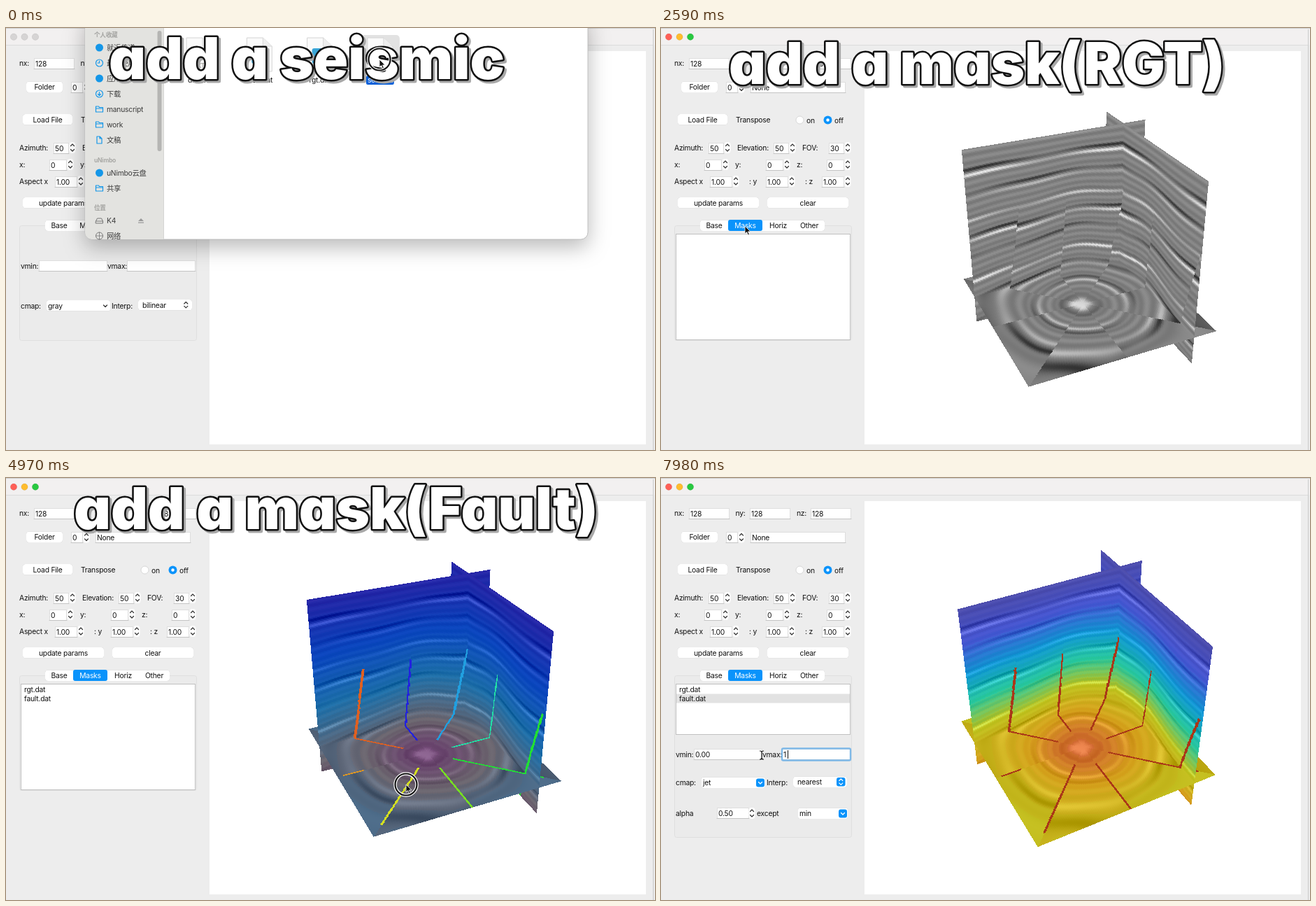
Write an HTML page with a canvas that moves like this. It is 928 px wide and 603 px high and loops after 8000 ms.

```html
<!DOCTYPE html>
<html lang="zh">
<head>
<meta charset="utf-8">
<title>Seismic volume viewer</title>
<style>
html, body { margin: 0; width: 100%; height: 100%; overflow: hidden; background: #ededed; }
#stage { position: relative; width: 928px; height: 603px; overflow: hidden; }
#stage > * { position: absolute; left: 0; top: 0; }
#view { left: 291px; top: 33px; }
text { font: 10.3px Inter, 'Noto Sans CJK SC', 'Noto Sans CJK', sans-serif; letter-spacing: -.22px; fill: #111; white-space: pre; }
text.white { fill: #fff; }
text.side { fill: #3c3c3c; }
text.head { font-size: 8.6px; font-weight: 600; fill: #a3a3a0; }
text.title { font: 900 82px Inter, 'Open Sans', sans-serif; font-feature-settings: 'cv11'; letter-spacing: 0;
  fill: #fff; stroke: #111; stroke-width: 5px; stroke-linejoin: round; paint-order: stroke;
  filter: drop-shadow(3px 3px 0 #a8a8a8); }
.dialog { filter: drop-shadow(0 11px 15px rgba(0, 0, 0, .27)); }
.btn { filter: drop-shadow(0 .6px .5px rgba(0, 0, 0, .28)); }
</style>
</head>
<body>
<div id="stage">
  <svg width="928" height="603"><g id="window"></g><g id="panel"></g></svg>
  <canvas id="view" width="624" height="562"></canvas>
  <svg width="928" height="603"><g id="finder"></g><g id="drag"></g><g id="title"></g><g id="cursor"></g></svg>
</div>
<script>
const LOOP = 8000, STEP = 70, BLUE = '#0a93fb';
const $ = id => document.getElementById(id);

// ---------- drawing helpers ----------
const text = (x, y, s, cls = '', anchor = 'start') =>
  `<text x="${x}" y="${y}" class="${cls}" text-anchor="${anchor}">${s}</text>`;
const rect = (x, y, w, h, fill, r = 0, more = '') =>
  `<rect x="${x}" y="${y}" width="${w}" height="${h}" rx="${r}" fill="${fill}" ${more}/>`;
const circle = (x, y, r, fill, more = '') => `<circle cx="${x}" cy="${y}" r="${r}" fill="${fill}" ${more}/>`;
const ring = (x, y, r, color, w = 1) => circle(x, y, r, 'none', `stroke="${color}" stroke-width="${w}"`);
const line = (d, color, w = 1.2) =>
  `<path d="${d}" fill="none" stroke="${color}" stroke-width="${w}" stroke-linecap="round" stroke-linejoin="round"/>`;
const field = (x, y, w, s = '') =>
  rect(x + .5, y + .5, w - 1, 15, '#fff', 0, 'stroke="#dedede"') +
  line(`M${x} ${y + 15.5}h${w}`, '#c4c4c4', 1) + text(x + 2, y + 12, s);
const button = (x, y, w, s) =>
  rect(x, y, w, 15.5, '#fff', 4, 'class="btn"') + text(x + w / 2, y + 11.5, s, '', 'middle');
const arrows = (x, y, color, gap = 2.5, w = 1.2) =>
  line(`M${x - 2.5} ${y - gap}l2.5 -2.5l2.5 2.5M${x - 2.5} ${y + gap}l2.5 2.5l2.5 -2.5`, color, w);
const spin = (x, y) => rect(x - 4.5, y - 8, 9, 16, '#fff', 4) + arrows(x, y, '#333');
const combo = (x, y, w, s, on) =>
  rect(x, y, w, 15.5, '#fff', 3, 'class="btn"') + text(x + 2, y + 11.5, s) +
  (on ? rect(x + w - 13, y + 2, 12, 12, BLUE, 3) : '') +
  line(`M${x + w - 9.5} ${y + 7}l2.5 2.5l2.5 -2.5`, on ? '#fff' : '#333', 1.3);
const popup = (x, y, w, s, on) =>
  rect(x, y, w, 15.5, '#fff', 4, 'class="btn"') + text(x + 6, y + 11.5, s) +
  (on ? rect(x + w - 15, y + 1.5, 12.5, 12.5, BLUE, 3) : '') + arrows(x + w - 8.7, y + 7.7, on ? '#fff' : '#333', 1.7);

// ---------- application window ----------
function drawWindow(on) {
  const lights = on ? ['#fe5f57', '#febc2e', '#28c840'] : Array(3).fill('#d6d4d4');
  let s = rect(0, 0, 928, 603, '#ededed') + rect(0, 0, 928, 24, '#f2f0f0') + rect(0, 24, 925, 1, '#dcdcdc') +
    rect(0, 0, 928, 1, '#cfcfcf') + rect(925, 2, 1, 601, '#cacaca') + rect(291, 33, 624, 562, '#fff');
  lights.forEach((c, i) => s += circle(11 + i * 15.5, 12.7, 4.7, c, 'stroke="#0002" stroke-width=".5"'));
  ['nx:', 'ny:', 'nz:'].forEach((name, i) => s += text(19 + 87.5 * i, 54, name) + field(40 + 87 * i, 43, 58, '128'));
  s += button(29, 76.5, 52, 'Folder') + field(93, 77, 17, '0') + spin(115, 84.5) + field(128, 77, 136, 'None');
  s += button(24, 123, 71, 'Load File') + text(107, 135, 'Transpose') +
    circle(198.5, 131.5, 5.5, '#fff', 'stroke="#d5d5d5"') + text(208, 135.5, 'on') +
    circle(238.5, 131.5, 6, BLUE) + circle(238.5, 131.5, 2.2, '#fff') + text(248, 135.5, 'off');
  // each cell: label, label x, spinner x; `gap` is the distance from field to spinner
  const row = (y, gap, value, ...cells) => cells.forEach(([name, x, at], i) =>
    s += text(x, y + 4, name) + field(at - gap, y - 7, gap - 5, [].concat(value)[i] || value) + spin(at, y));
  row(171, 27, ['50', '50', '30'], ['Azimuth:', 19, 95], ['Elevation:', 109, 188], ['FOV:', 202, 267]);
  row(195, 30, '0', ['x:', 19, 92], ['y:', 106, 180], ['z:', 194, 267]);
  row(219, 37, '1.00', ['Aspect x', 19, 107], [': y', 126, 187], [': z', 206, 267]);
  return s + button(24, 242, 116, 'update params') + button(152, 242, 116, 'clear');
}

function drawPanel({ on, tab, loaded, rows, selected, vmax, focus }) {
  const detail = selected >= 0;
  let s = rect(19.5, 282.5, 253, detail ? 231 : 164, '#ebebeb', 3, 'stroke="#dfdfdf"');
  s += rect(56, 274.5, 178, 15.5, '#fff', 4, 'class="btn"');
  [['Base', 56, 40], ['Masks', 96, 49], ['Horiz', 145, 45], ['Other', 190, 44]].forEach(([name, x, w], i) => {
    const hot = i === tab && on;
    s += (hot ? rect(x, 274, w, 16, BLUE, 3) : '') + text(x + w / 2, 286, name, hot ? 'white' : '', 'middle');
  });
  const limits = (y, lo, hi) => text(21, y + 4, 'vmin:') + field(47, y - 8, 98, lo) + text(145, y + 4, 'vmax:') +
    field(173, y - 8, 98, hi);
  const maps = (y, cmap, interp) => text(21, y + 4, 'cmap:') + combo(58, y - 7.5, 91, cmap, on) +
    text(151, y + 4, 'Interp:') + popup(189, y - 8.5, 77, interp, on);
  if (tab === 0) return s + limits(340, loaded ? '-0.12' : '', loaded ? '0.15' : '') + maps(396.5, 'gray', 'bilinear');
  s += rect(21.5, 294.5, 249, detail ? 72 : 151, '#fff', 0, 'stroke="#c0c0c0"');
  if (detail) s += rect(22, 295 + 13.5 * selected, 248, 13, '#e2e2e2');
  rows.forEach((name, i) => s += text(26, 305.5 + 13.5 * i, name));
  if (!detail) return s;
  s += limits(395, '0.00', vmax) + maps(435, 'jet', 'nearest') + text(21, 483, 'alpha') + field(80, 471, 46, '0.50') +
    spin(130, 479) + text(137, 483, 'except') + combo(196, 471.5, 71, 'min', on);
  if (focus) s += rect(173, 386.5, 98, 17, 'none', 2, 'stroke="#7fb9e8" stroke-width="2.4"') +
    rect(176 + 5 * vmax.length, 389, 1, 12, '#111');
  return s;
}

// ---------- file browser ----------
const FILES = ['dim.txt', 'fault.dat', 'rgt.dat', 'seis.dat'];
const fileX = i => 276 + 86.3 * i;

const fileIcon = (x, y, plain) =>
  `<path d="M${x - 18} ${y}h23l13 12v36h-36z" fill="#fafafa" stroke="#d4d4d4"/>` +
  `<path d="M${x + 5} ${y}v12h13" fill="#eee" stroke="#d8d8d8"/>` +
  (plain ? text(x, y + 43, 'TXT', 'head', 'middle') : rect(x - 11, y + 15, 22, 22, '#3aa6d8', 3));
const label = (x, y, s, hot) => {
  const w = s.length * 4.6 + 3;
  return (hot ? rect(x - w / 2, y - 10, w, 13, '#0a60d8', 2.5) : '') + text(x, y, s, hot ? 'white' : '', 'middle');
};
const sideIcon = (kind, y) => {
  const c = '#1597e8', x = 133.5;
  return {
    dot: circle(x, y, 5.5, c),
    clock: ring(x, y, 5, c, 1.2) + line(`M${x} ${y - 3}v3h-2.5`, c),
    down: ring(x, y, 5, c, 1.2) + line(`M${x} ${y - 2.5}v5m-2 -2l2 2l2 -2`, c),
    folder: line(`M${x - 5} ${y + 4}v-8h4l1 1.5h5v6.5zM${x - 5} ${y - 1}h10`, c),
    page: line(`M${x - 3.5} ${y - 5}h4l3 3v7h-7zM${x + .5} ${y - 5}v3h3`, c),
    disk: line(`M${x - 5} ${y + 1}l2 -4h6l2 4v3h-10zM${x - 5} ${y + 1}h10`, '#777', 1),
    globe: ring(x, y, 5, '#777') + line(`M${x - 5} ${y}h10M${x} ${y - 5}v10`, '#777', .8)
  }[kind];
};

function drawFinder(selected) {
  let s = '<g class="dialog">' + rect(113, -20, 719, 322, '#fff', 10, 'stroke="#b4b4b4" stroke-width=".8"') + '</g>' +
    '<path d="M113 0H225.5V302H123a10 10 0 0 1-10-10z" fill="#e3e3e0"/>' + rect(225, 0, 1, 302, '#d5d5d3') +
    rect(216.5, 4, 6, 172, '#b5b5b3', 3);
  const section = (y, head, ...items) => {
    s += text(126, y, head, 'head');
    items.forEach(([icon, name], i) => {
      const iy = y + 15 + 22 * i;
      s += sideIcon(icon, iy) + text(144, iy + 4, name, 'side');
    });
  };
  section(13, '个人收藏', ['dot', '就近传递'], ['clock', '最近使用'], ['dot', '应用程序'], ['down', '下载'],
    ['folder', 'manuscript'], ['folder', 'work'], ['page', '文稿']);
  section(192, 'uNimbo', ['dot', 'uNimbo云盘'], ['folder', '共享']);
  section(260, '位置', ['disk', 'K4'], ['globe', '网络']);
  s += '<path d="M189 276l4 -4l4 4zM189 277.5h8v1.2h-8z" fill="#999"/>';
  FILES.forEach((name, i) => {
    const x = fileX(i), hot = i === selected;
    s += (hot ? rect(x - 28, 10, 56, 62, '#e2e2e2', 5) : '') + fileIcon(x, 14, !i) + label(x, 78, name, hot);
  });
  return s;
}

// ---------- seismic volume ----------
const hex = s => [1, 3, 5].map(i => parseInt(s.slice(i, i + 2), 16));
const DEEP = ['#2424a5', '#0a46be', '#1e70aa', '#6c666f', '#6e3273'].map(hex);
const JET = ['#4b4baa', '#4656d2', '#0f96d2', '#28c8a0', '#bec31e', '#d7a21e', '#cd5f32'].map(hex);
const RED = hex('#aa3718');

function ramp(stops, p) {
  const at = Math.max(0, Math.min(.999, p)) * (stops.length - 1), i = Math.floor(at);
  return stops[i].map((v, j) => v + (stops[i + 1][j] - v) * (at - i));
}

// hue runs from blue to orange around the eight faults
function faultColor(k) {
  const hue = 20 + 220 * (1 - (k + 7) % 8 / 7) ** 1.3;
  return [0, 8, 4].map(n => {
    const m = (n + hue / 30) % 12;
    return 128 - 95 * Math.max(-1, Math.min(m - 3, 9 - m, 1));
  });
}

// evenly spaced reflectors: a bright line with a dark one above it
function reflection(time, x, y) {
  const gap = .11, first = Math.floor((1.11 - time) / gap), bell = d => Math.exp(-d * d);
  let sum = .09 * Math.sin(time * 170);
  for (let k = Math.max(0, first); k <= first + 1; k++) {
    const d = (time - 1.11 + gap * k) / .0085;
    const patch = .7 + .4 * Math.sin(9 * x + 8 * y + 2.4 * k);
    sum += patch * (.75 * Math.abs(Math.sin(1.9 * k)) * bell(d) - .7 * Math.abs(Math.cos(1.1 * k)) * bell(d + 3.1));
  }
  return sum;
}

function voxel(x, y, z, look, lit) {
  const depth = .5 - z, r = Math.hypot(x, y);
  // eight radial faults split the dome into sectors
  const sector = (Math.PI * .75 - Math.atan2(y, x) - .3 * (.84 - depth)) / (Math.PI / 4) + 8;
  const near = Math.round(sector), k = near % 8;
  if (look.faults && depth > .43 && r > (k === 7 ? .36 : .14) && r < (k === 7 ? .47 : .62) &&
      Math.abs(sector - near) * r * Math.PI / 4 < .0055) return look.red ? RED : faultColor(k);
  const side = Math.floor(sector) % 2 ? 1 : -1;
  const slip = side * .4 * r * Math.max(0, depth - .35) * (1 - depth);
  const time = depth * (.86 + .33 * Math.exp(-r * r / .1)) + slip +
    .025 * depth * (1.15 - depth) * Math.sin(13 * x + 3) * Math.cos(11 * y);
  const wave = reflection(time, x, y);
  if (look.mask) {
    const level = Math.round(time * 45) / 45;
    return ramp(look.bright ? JET : DEEP, level / (look.bright ? 1.02 : 1.1)).map(v => v + wave * 45);
  }
  const gray = 130 + 115 * wave;
  return lit ? [gray * 1.18, gray * 1.18, gray * .95] : [gray, gray, gray];
}

const N = 200, cache = [];
function slice(axis, pos, look, lit) {
  const key = [pos, JSON.stringify(look), lit].join();
  if (cache[axis] && cache[axis].key === key) return cache[axis].data;
  const data = new Uint32Array(N * N);
  const clamp = v => Math.max(0, Math.min(255, v | 0));
  for (let j = 0; j < N; j++) for (let i = 0; i < N; i++) {
    const point = [(i + .5) / N - .5, (j + .5) / N - .5];
    point.splice(axis, 0, pos);
    const [r, g, b] = voxel(...point, look, lit);
    data[j * N + i] = (255 << 24 | clamp(b) << 16 | clamp(g) << 8 | clamp(r)) >>> 0;
  }
  cache[axis] = { key, data };
  return data;
}

const ctx = $('view').getContext('2d');
const image = ctx.createImageData(624, 562), pixels = new Uint32Array(image.data.buffer);

// casts one ray per pixel at the three slices
function drawCube({ look, turn, tilt, planes, lit }) {
  pixels.fill(0xffffffff);
  if (look) {
    const rad = Math.PI / 180, a = (turn + 45) * rad, c = Math.cos(tilt * rad), s = Math.sin(tilt * rad);
    const focal = 1049, dist = 3.694, sin = Math.sin(a), cos = Math.cos(a);
    const tex = planes.map((p, i) => slice(i, p, look, lit === i));
    const ex = -dist * sin * c, ey = -dist * cos * c, ez = dist * s;
    const cell = v => Math.min(N - 1, (v + .5) * N | 0);
    const inside = v => v >= -.5 && v <= .5;
    for (let py = 20; py < 545; py++) for (let px = 70; px < 560; px++) {
      const u = (px - 312) / focal, v = (280 - py) / focal, f = c + v * s;
      const dx = sin * f + cos * u, dy = cos * f - sin * u, dz = v * c - s;
      let best = 99, color = 0xffffffff;
      const hit = (t, p, q, data) => {
        if (t > 0 && t < best && inside(p) && inside(q)) { best = t; color = data[cell(q) * N + cell(p)]; }
      };
      const tx = (planes[0] - ex) / dx, ty = (planes[1] - ey) / dy, tz = (planes[2] - ez) / dz;
      hit(tx, ey + tx * dy, ez + tx * dz, tex[0]);
      hit(ty, ex + ty * dx, ez + ty * dz, tex[1]);
      hit(tz, ex + tz * dx, ey + tz * dy, tex[2]);
      pixels[py * 624 + px] = color;
    }
  }
  ctx.putImageData(image, 0, 0);
}

// ---------- timeline ----------
const within = (t, a, b) => t >= a && t < b;
const ramped = (t, a, b) => Math.max(0, Math.min(1, (t - a) / (b - a)));
const eased = (t, a, b) => { const k = ramped(t, a, b); return k * k * (3 - 2 * k); };

// resting places of the pointer: time, x, y
const POINTER = [[0, 534, 45], [700, 600, 420], [1260, 493, 284], [1960, 647, 299], [2450, 560, 420], [2590, 120, 283],
  [3010, 447, 45], [3150, 450, 88], [3570, 150, 370], [4130, 361, 45], [4410, 150, 370], [4970, 572, 438],
  [5390, 60, 302], [6090, 60, 316], [6510, 551, 391], [7070, 562, 425], [7630, 144, 396]];

function pointerAt(t) {
  const i = POINTER.findIndex(p => p[0] > t);
  if (i < 0) return POINTER[POINTER.length - 1].slice(1);
  const [from, x, y] = POINTER[i - 1], [to, nx, ny] = POINTER[i], k = eased(t, from, to);
  return [x + (nx - x) * k, y + (ny - y) * k];
}

function drawCursor(t) {
  const [x, y] = pointerAt(t);
  if (t >= 7560) return line(`M${x - 2.5} ${y - 6}q2.5 0 2.5 2q0 -2 2.5 -2M${x} ${y - 4}v8m-2.5 2q2.5 0 2.5 -2q0 2 2.5 2`, '#111');
  const pressed = [[0, 700], [3080, 3570], [4130, 4410], [4900, 5180], [6440, 7070]].some(span => within(t, ...span));
  let s = '';
  if (within(t, 980, 1400)) s = ring(x, y, 15, '#fff', 5) + ring(x, y, 16.5, '#e2483d', 2) + ring(x, y, 13.5, '#e2483d');
  else if (pressed) s = ring(x, y, 15.5, '#fff', 4.5) + ring(x, y, 15.5, '#111', 2.2);
  return s + `<path d="M${x} ${y}v11l2.6 -2.4l1.9 4.2l1.9 -.9l-1.9 -4h3.5z" fill="#111" stroke="#fff" stroke-width=".8"/>`;
}

function drawDrag(t) {
  const file = within(t, 140, 770) ? 3 : within(t, 3080, 3640) ? 2 : within(t, 4200, 4410) ? 1 : 0;
  if (!file) return '';
  const [x, y] = pointerAt(t);
  return '<g opacity=".75">' + fileIcon(x + 9, y - 34) + label(x + 9, y + 32, FILES[file], true) + '</g>';
}

function drawTitle(t) {
  if (t < 1750) return text(147, 73, 'add a seismic', 'title');
  if (within(t, 2590, 3920)) return text(97, 80, 'add a mask(RGT)', 'title');
  return within(t, 3920, 5040) ? text(97, 73, 'add a mask(Fault)', 'title') : '';
}

const drawn = {};
function update(name, state, draw) {
  const key = JSON.stringify(state);
  if (drawn[name] === key) return;
  drawn[name] = key;
  const markup = draw(state);
  if (markup !== undefined) $(name).innerHTML = markup;
}

function render(t) {
  const browsing = t < 980 || within(t, 2660, 4690), on = !browsing;
  const orbit = eased(t, 2240, 2520), lift = eased(t, 5110, 6510), settle = eased(t, 6510, 7210);
  update('window', on, drawWindow);
  update('panel', {
    on, tab: t < 2520 ? 0 : 1, loaded: t >= 770,
    rows: ['rgt.dat', 'fault.dat'].slice(0, t < 3640 ? 0 : t < 4410 ? 1 : 2),
    selected: t < 5390 ? -1 : t < 6090 ? 0 : 1,
    vmax: t < 6090 ? '1.00' : t < 7700 ? '8.00' : t < 7840 ? '' : '1', focus: t >= 7630
  }, drawPanel);
  update('cube', {
    look: t < 770 ? null : { mask: t >= 3640, faults: t >= 4410, bright: t >= 5740, red: t >= 7840 },
    turn: -5 - 15.2 * orbit + .7 * lift + 2.3 * settle,
    tilt: 50 - 20.3 * orbit + 4.8 * lift + 4.5 * settle,
    planes: [.5 - .13 * ramped(t, 1540, 1960), .5 - .2 * ramped(t, 980, 1358), -.5 + .16 * ramped(t, 2030, 2240)],
    lit: within(t, 980, 1470) ? 1 : within(t, 1540, 2030) ? 0 : within(t, 2030, 2240) ? 2 : -1
  }, drawCube);
  update('finder', browsing ? (t < 980 ? 3 : t < 3010 ? -1 : t < 4060 ? 2 : 1) : null,
    file => file === null ? '' : drawFinder(file));
  update('drag', t, drawDrag);
  update('title', drawTitle(t), s => s);
  update('cursor', t, drawCursor);
}

const start = performance.now();
function tick() {
  const t = Math.max(0, performance.now() - start) % LOOP;
  render(Math.floor(t / STEP) * STEP);
  requestAnimationFrame(tick);
}
tick();
</script>
</body>
</html>
```
